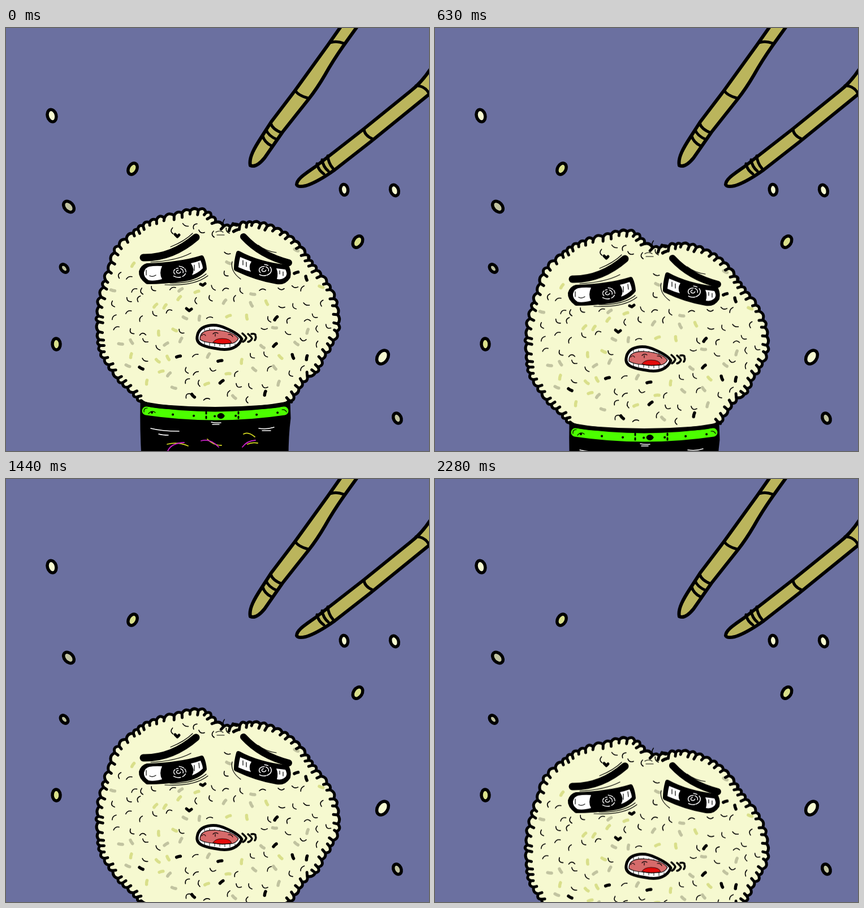
Animation of 748x748 px, one loop 2310 ms. Source, as an HTML page:

```html
<!DOCTYPE html>
<html lang="en">
<head>
<meta charset="utf-8">
<title>Sinking rice ball</title>
<style>
  html, body { margin: 0; width: 100%; height: 100%; overflow: hidden; background: #6b70a0; }
  svg { display: block; width: 100%; height: 100%; }
  path, ellipse { fill: none; stroke: #000; stroke-linecap: round; stroke-linejoin: round; }
  .wood { fill: #bbb55c; stroke-width: 6; }
  .band { stroke-width: 5; }
  .seed { stroke-width: 5.5; }
  .thin { stroke-width: 1.2; }
  .rice { fill: #f6f9d0; stroke: none; }
  .edge { stroke-width: 5; }
  .solid { fill: #000; }
  .white { fill: #fff; stroke: none; }
  .chalk { stroke: #fff; stroke-width: 1.5; }
  .yellow { stroke: #d4d820; stroke-width: 1.8; }
  .magenta { stroke: #c81fc8; stroke-width: 1.8; }
  #hero { animation: sink 2310ms steps(77) infinite; }
  @keyframes sink { to { transform: translateY(139.6px); } }
</style>
</head>
<body>
<svg viewBox="0 0 748 748">
  <g id="seeds"></g>

  <g id="sticks">
    <path class="wood" d="M432 243C429 229 440 211 451 194L469 166L510 112L570 29L596-8H625L597 31Q578 58 564 83Q550 107 535 126L489 184L457 230Q442 248 432 243Z"/>
    <path class="band" d="M573 26Q584 22 597 27M512 111Q516 119 534 124M468 168Q471 179 487 185M460 180Q464 191 479 197M454 191Q457 202 469 208"/>
    <path class="wood" d="M514 277C514 267 529 258 546 246L632 179L716 111Q738 94 756 64V111L645 201L581 251Q550 273 530 279Q516 282 514 277Z"/>
    <path class="band" d="M725 102Q741 102 748 116M633 179Q634 190 648 196M569 226Q570 239 578 248M559 233Q561 246 570 253M550 240Q552 251 562 258"/>
  </g>

  <g id="hero">
    <path class="solid" stroke-width="3" d="M239 661Q370 684 501 661L502 690Q498 720 498 760H241Q238 710 239 661Z"/>
    <path d="M248 677Q370 695 492 677" style="stroke:#4cff00;stroke-width:15"/>
    <path d="M354 679V692M411 679V692" stroke-width="3" stroke-dasharray="3 5"/>
    <path d="M258 680Q370 693 482 680" stroke-width="4" stroke-dasharray=".1 37"/>
    <path class="thin" d="M244 679Q243 672 250 672M252 682Q258 675 264 680M488 675Q494 674 496 679"/>
    <ellipse class="solid" cx="380" cy="686" rx="6" ry="4.5"/>
    <path class="chalk" d="M256 708Q275 713 306 713M270 718Q277 720 287 720M363 697Q371 699 380 698M365 701H377M447 708Q462 710 474 706M453 712H468"/>
    <path class="yellow" d="M420 718Q428 713 440 723M285 736Q304 731 322 739M356 727Q366 738 381 738M427 736Q435 732 445 734"/>
    <path class="magenta" d="M286 748Q292 734 315 733M345 730Q361 725 376 741M418 741Q426 730 441 729"/>

    <path id="ball" class="rice"/>
    <g id="grains"></g>
    <path id="edge" class="edge"/>
    <path d="M239 660Q247 668 282 670Q370 677 458 670Q494 668 501 660" stroke-width="7"/>

    <path d="M243 406Q293 407 336 370" stroke-width="13"/>
    <path d="M420 369Q450 402 500 415" stroke-width="12"/>
    <path class="thin" d="M291 387Q316 377 330 363M256 414Q300 412 327 398M281 454Q333 457 357 438M290 451Q333 452 354 435M446 384Q460 395 478 397M400 413Q396 430 415 444M371 361Q378 357 384 361M373 366H386"/>

    <path class="solid" stroke-width="8" d="M250 420Q308 418 346 406Q350 414 351 426Q340 440 315 444Q280 449 250 449Q238 440 239 431Q242 422 250 420Z"/>
    <path class="white" d="M253 422Q263 420 276 421Q270 434 276 444Q261 448 252 446Q243 440 244 432Q246 424 253 422ZM327 416Q336 414 344 411Q348 420 348 425Q340 433 329 437Q335 427 327 416Z"/>
    <path class="thin" d="M248 428V437M254 438Q259 441 265 437M333 419V429M341 415L342 424"/>

    <path class="solid" stroke-width="8" d="M411 398Q445 417 497 423Q501 432 499 440Q492 451 479 449Q445 444 407 426Q407 412 411 398Z"/>
    <path class="white" d="M414 405Q424 409 434 413Q428 422 433 431Q422 428 411 423Q412 413 414 405ZM478 425Q486 426 494 427Q498 434 495 439Q489 446 479 444Q482 434 478 425Z"/>
    <path class="thin" d="M419 411V419M425 414V422M484 429V435M490 431V438"/>
    <path id="glints" class="chalk"/>

    <path d="M338 546C341 523 370 522 389 531Q412 541 417 550C411 565 396 570 379 568C351 564 336 560 338 546Z" style="fill:#fff;stroke-width:5"/>
    <path id="teeth" stroke-width=".9"/>
    <path d="M343 551C342 536 357 533 371 534Q401 536 411 549Q406 559 394 558Q381 560 366 557Q351 556 343 551Z" style="fill:#d66b6b;stroke-width:1.2"/>
    <path d="M366 556Q370 549 382 549Q397 549 399 557Q380 560 366 556Z" style="fill:#e30b0b;stroke-width:.8"/>
    <path class="thin" d="M346 544Q350 539 353 544M366 541Q370 537 375 540M370 545V541M393 542Q399 541 401 546"/>
    <path d="M418 540Q424 545 425 548Q423 553 419 555M428 541Q434 546 435 549Q433 554 428 555M434 541Q442 540 441 544Q443 548 440 552" stroke-width="3.5"/>
  </g>
</svg>

<script>
  const NS = 'http://www.w3.org/2000/svg';
  const $ = id => document.getElementById(id);
  const cream = '#f6f9d0', lime = '#d9df8a', grey = '#c1c3a0';

  function add(parent, tag, attrs) {
    const el = document.createElementNS(NS, tag);
    for (const k in attrs) el.setAttribute(k, attrs[k]);
    return parent.appendChild(el);
  }

  let state = 11;
  const rand = () => (state = state * 16807 % 2147483647) / 2147483647;
  const vary = (mid, spread) => mid + (rand() * 2 - 1) * spread;

  // Loose seeds: x, y, size, tilt
  function scatter(fill, ...seeds) {
    for (const [x, y, size, tilt] of seeds) add($('seeds'), 'ellipse', {
      class: 'seed', rx: size * .7, ry: size, style: `fill:${fill}`,
      transform: `translate(${x} ${y}) rotate(${tilt})`
    });
  }
  scatter(cream, [81, 155, 11, -15], [598, 286, 9.5, -8], [687, 287, 10, -20], [666, 582, 13, 33]);
  scatter(lime, [224, 249, 10.5, 28], [89, 559, 10, -3], [622, 378, 11, 32]);
  scatter(grey, [111, 316, 11, -42], [103, 425, 8, -40], [692, 690, 9.5, -25]);

  // Uneven scallops with inward tails along a clockwise guide
  const guide = add($('hero'), 'path', {
    visibility: 'hidden',
    d: `M239 660C228 640 202 630 192 610S166 585 164 540S166 480 178 442S188 395 210 376
      S245 343 280 336S345 308 364 337S420 343 440 345S510 365 527 398S567 440 580 480
      S588 540 566 572S552 616 536 614L525 618C522 640 508 645 501 660`
  });
  const total = guide.getTotalLength();
  let outline = 'M239 660', tails = '', p = guide.getPointAtLength(0);
  for (let s = 0; s < total;) {
    s += vary(14, 4);
    const q = guide.getPointAtLength(Math.min(s, total));
    const len = Math.hypot(q.x - p.x, q.y - p.y) || 1;
    const tx = (q.x - p.x) / len, ty = (q.y - p.y) / len;
    const h = vary(8, 2), d = vary(6, 2);
    outline += `Q${(p.x + q.x) / 2 + ty * h} ${(p.y + q.y) / 2 - tx * h} ${q.x} ${q.y}`;
    if (s < total) tails += `M${q.x} ${q.y}l${-ty * d - tx * 2} ${tx * d - ty * 2}`;
    p = q;
  }
  $('ball').setAttribute('d', outline + 'Q370 684 239 660Z');
  $('edge').setAttribute('d', outline + tails);

  // Rice texture: dabs and curls on a jittered grid, kept clear of the face
  const marks = { [grey]: '', [lime]: '', '#000': '', curl: '' };
  const face = [[230, 360, 362, 458], [397, 360, 510, 456], [328, 515, 450, 578]];
  const step = 24;
  for (let y = 342; y < 668; y += step) for (let x = 170; x < 585; x += step) {
    const cx = vary(x, 9), cy = vary(y, 9), turn = rand() * Math.PI, pick = rand();
    const inside = ((cx - 374) / 200) ** 2 + ((cy - 502) / 162) ** 2 < 1;
    if (!inside || face.some(([l, t, r, b]) => cx > l && cx < r && cy > t && cy < b)) continue;
    const kind = pick < .09 ? '#000' : pick < .25 ? grey : pick < .4 ? lime : 'curl';
    const half = kind === 'curl' ? 5.5 : 3.5, bend = kind === 'curl' ? vary(1, .4) : .2;
    const c = Math.cos(turn) * half, s = Math.sin(turn) * half;
    marks[kind] += `M${cx - c} ${cy - s}Q${cx - s * bend} ${cy + c * bend} ${cx + c} ${cy + s}`;
  }
  for (const kind in marks) {
    const curl = kind === 'curl';
    add($('grains'), 'path', {
      d: marks[kind], style: `stroke:${curl ? '#000' : kind};stroke-width:${curl ? 1.6 : 5.5}`
    });
  }
  add($('grains'), 'path', {
    d: 'M299 365l4 4l3-3M344 453l4 2l4-3M319 496l5 4l4-3', 'stroke-width': 5
  });

  // Scribbled rings inside each iris
  function glints(cx, cy) {
    let d = '';
    for (let i = 0; i < 14; i++) {
      const a = i * 2.4, r = 3 + i % 3 * 4;
      const at = t => `${cx + Math.cos(t) * r * 1.2} ${cy + Math.sin(t) * r * .9}`;
      d += `M${at(a)}A${r * 1.2} ${r * .9} 0 0 1 ${at(a + vary(.7, .3))}`;
    }
    return d;
  }
  $('glints').setAttribute('d', glints(305, 431) + glints(456, 428));

  let teeth = '';
  for (let x = 351; x < 406; x += 9)
    teeth += `M${x} ${530 + (x - 351) * .13}v5M${x} ${555 + (x - 351) * .06}v6`;
  $('teeth').setAttribute('d', teeth);
</script>
</body>
</html>
```
